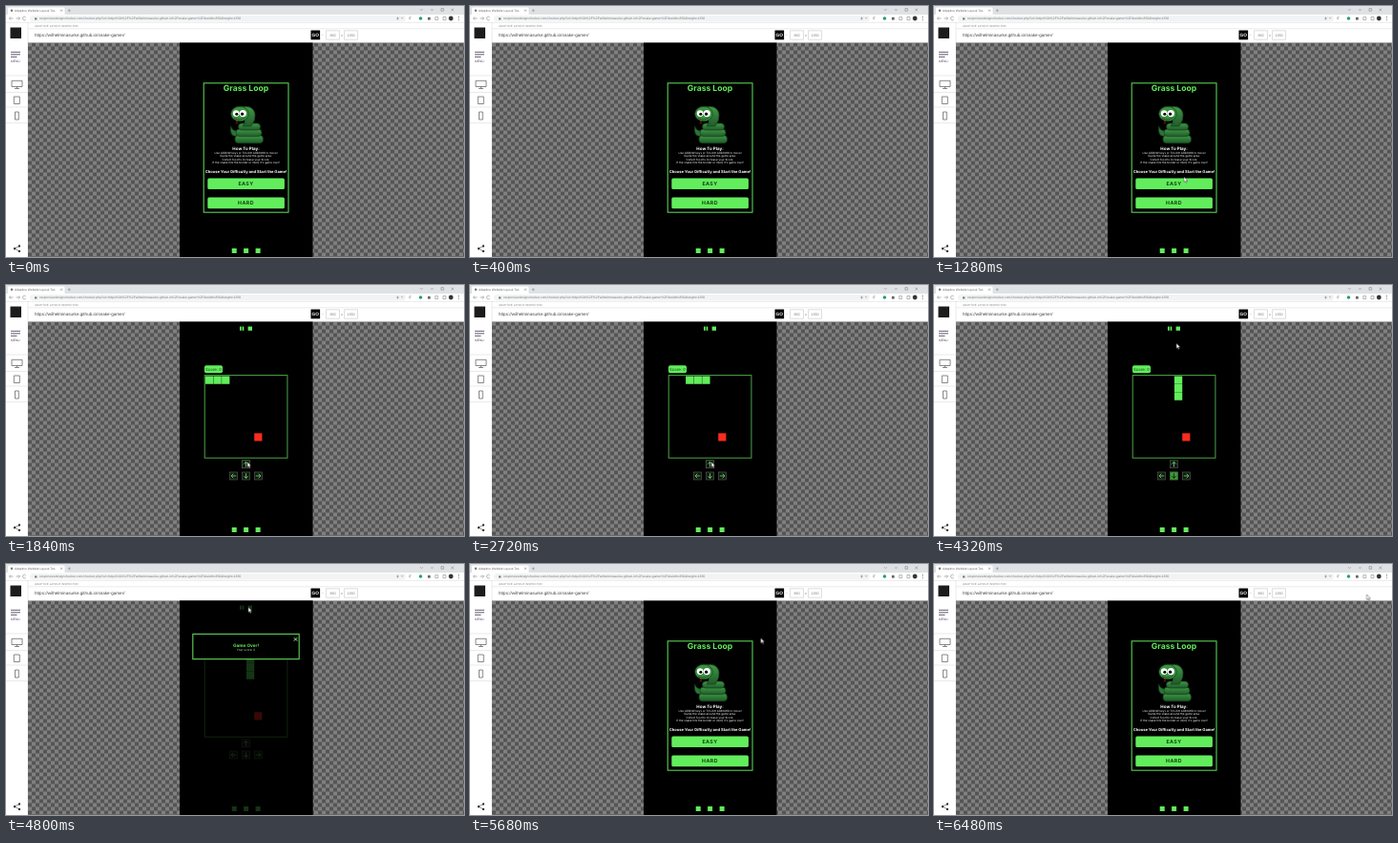
An HTML page that plays this animation: 480 px wide and 263 px high, repeating every 6.56 s.

```html
<!DOCTYPE html>
<html lang="en">
<head>
<meta charset="utf-8">
<title>Grass Loop demo</title>
<style>
  :root { --green: #62ee5c; --loop: 6560ms; }
  html, body { margin: 0; width: 100%; height: 100%; overflow: hidden; background: #fff; }
  svg { display: block; width: 100%; height: 100%; }
  text { font-family: "Liberation Sans", Arial, sans-serif; text-rendering: geometricPrecision; }
  .app text { font-family: Inter, Roboto, sans-serif; text-anchor: middle; }
  .app .bold { font-weight: 700; }
  .g { fill: var(--green); }
  .w { fill: #fff; }
  .frame { fill: none; stroke: #57d152; stroke-width: 1.1; }
  .board { fill: none; stroke: #4aa646; stroke-width: 1; }
  .icon { fill: none; stroke: #555; stroke-width: .7; }
  .thin { fill: none; stroke: #888; stroke-width: .6; }
  .rule { stroke: #dcdcdc; stroke-width: .6; }
  .key { fill: #141814; stroke: #5c625c; stroke-width: .6; }
  .arrow { fill: none; stroke: #5ad655; stroke-width: .9; }
  .lit .key { fill: #3f973c; stroke: #2f6a2d; }
  .lit .arrow { stroke: #0d260d; }

  .home, .game, .modal, .up, .down, .snake { animation: var(--loop) step-end infinite; }
  .home { animation-name: home; }
  .game { animation-name: game; }
  .modal { animation-name: modal; }
  .up { animation-name: up; }
  .down { animation-name: down; }
  .snake {
    fill: none; stroke: var(--green); stroke-width: 8.3;
    stroke-dasharray: 8.25 .35 8.25 .35 8.25 200;
    animation-name: crawl;
  }
  .cursor { animation: move var(--loop) linear infinite, show var(--loop) step-end infinite; }

  @keyframes home { 0%, 86.5% { visibility: visible } 25.5% { visibility: hidden } }
  @keyframes game { 0%, 86.5% { visibility: hidden } 25.5% { visibility: visible } }
  @keyframes modal { 0%, 86.5% { visibility: hidden } 69.5% { visibility: visible } }
  @keyframes up { 0%, 48.7% { opacity: 0 } 25.5% { opacity: 1 } }
  @keyframes down { 0%, 69.5% { opacity: 0 } 51.2% { opacity: 1 } }
  @keyframes crawl {
    0% { stroke-dashoffset: 0 }
    32.9% { stroke-dashoffset: -8.6 }
    41.4% { stroke-dashoffset: -17.2 }
    48.7% { stroke-dashoffset: -25.8 }
    56% { stroke-dashoffset: -34.4 }
    64.6% { stroke-dashoffset: -43 }
  }
  @keyframes show { 0% { opacity: 0 } 19.5% { opacity: 1 } }
  @keyframes move {
    0%, 19.5% { transform: translate(262px, 179px) }
    23.1%, 47.5% { transform: translate(253px, 185.5px) }
    50%, 53.5% { transform: translate(252px, 198px) }
    57.3% { transform: translate(255px, 181px) }
    67%, 75.6% { transform: translate(254px, 45.3px) }
    84.1%, 86.5% { transform: translate(303px, 78px) }
    96.3% { transform: translate(467px, 32px) }
    98.7%, 100% { transform: translate(453.5px, 32px) }
  }
</style>
</head>
<body>
<svg viewBox="0 0 480 263" preserveAspectRatio="none">
  <defs>
    <pattern id="check" x="23" y="38.5" width="8" height="8" patternUnits="userSpaceOnUse">
      <rect width="8" height="8" fill="#555"/>
      <path d="M0 0h4v4h-4zM4 4h4v4h-4z" fill="#808080"/>
    </pattern>
    <g id="key">
      <rect class="key" x="-4" y="-4" width="8" height="8"/>
      <path class="arrow" d="M0 2.7V-2.4M-2.3 -.2L0 -2.5L2.3 -.2"/>
    </g>
    <linearGradient id="skin" x2="0" y2="1">
      <stop offset="0" stop-color="#3f9a45"/>
      <stop offset="1" stop-color="#1f5a2a"/>
    </linearGradient>
  </defs>

  <!-- browser -->
  <rect width="480" height="263" fill="#fff"/>
  <rect width="480" height="9" fill="#dfe2e5"/>
  <path d="M2 9V3q0-1.5 1.5-1.5H60q1.5 0 1.5 1.5V9z" fill="#fff"/>
  <circle cx="6" cy="4.8" r="1.2" fill="#777"/>
  <text x="9" y="6" font-size="3.3" fill="#666">Adaptive Website Layout Tes</text>
  <path class="thin" d="M57 3.6l2.2 2.2m0-2.2l-2.2 2.2M64.8 4.8h3m-1.5-1.5v3M445 4h3M456 2.6h2.6v2.6h-2.6zM466.5 2.6l2.8 2.8m0-2.8l-2.8 2.8M434 3.2l1.4 1.4l1.4-1.4"/>
  <path class="thin" d="M7.5 13h-4m1.6-1.6L3.5 13l1.6 1.6M10.5 13h4m-1.6-1.6l1.6 1.6l-1.6 1.6M20.8 12a1.8 1.8 0 1 0 0 2"/>
  <rect x="25" y="10" width="394" height="6.2" rx="3.1" fill="#f1f3f4"/>
  <rect x="30" y="12.4" width="2.4" height="2" fill="#777"/>
  <text x="35" y="14.4" font-size="3.4" fill="#777">responsivedesignchecker.com/checker.php?url=https%3A%2F%2Fwilhelminasurke.github.io%2Fsnake-gamer%2F&amp;width=850&amp;height=1350</text>
  <path class="thin" d="M409 13h3m-1.5-1.5v3M414 12l1.2 1.2 1.2-1.2M424 13.8h-1.2v-2h2"/>
  <circle cx="434.5" cy="13" r="1.8" fill="#26a269"/>
  <path d="M442 11.8h2.8v2.8h-2.8z" fill="#666"/>
  <path class="thin" d="M449.8 11.6h3v3h-3zM458 11.5h3v3.2h-3z"/>
  <circle cx="466.3" cy="13" r="2.4" fill="#333"/>
  <path d="M474 11h.9v.9h-.9zm0 1.7h.9v.9h-.9zm0 1.7h.9v.9h-.9z" fill="#777"/>
  <path class="rule" d="M0 17.3H480M23 23.8H480M23 38.2H480M23 17V263"/>

  <!-- sidebar -->
  <rect x="4.5" y="22.5" width="11.5" height="11.5" fill="#1c1c1c"/>
  <path d="M5 48.3h10M5 50.8h10M5 53.3h6.5" stroke="#54465f" stroke-width=".9"/>
  <text x="9.8" y="58.6" font-size="3.3" fill="#54465f" text-anchor="middle">MENU</text>
  <path class="rule" d="M0 73H23M0 90.5H23M0 106H23M0 122.5H23"/>
  <path class="icon" d="M6 78.3h11v6.2H6zM11.5 84.5v2M9 86.5h5M8.3 95h6v7.5h-6zM9.5 111h3.8v8H9.5z"/>
  <path d="M14 251.5L9 254.2L14 257" class="icon"/>
  <path d="M13 250.6h2v2h-2zM8 253.2h2v2H8zM13 256h2v2h-2z" fill="#222"/>

  <!-- address row -->
  <text x="30" y="21.8" font-size="3" fill="#888">ADAPTIVE LAYOUT INSPECTOR</text>
  <text x="30" y="32.2" font-size="4.6" fill="#444">https://wilhelminasurke.github.io/snake-gamer/</text>
  <rect x="319.5" y="25.5" width="9.6" height="9.8" fill="#000"/>
  <text x="324.3" y="32.1" font-size="4.8" font-weight="700" fill="#fff" text-anchor="middle">GO</text>
  <g fill="none" stroke="#c8c8c8" stroke-width=".6">
    <path d="M335.5 25.8h14v9.4h-14zM354.5 25.8h14v9.4h-14zM331 30.4h1.6"/>
  </g>
  <g font-size="3.7" fill="#777" text-anchor="middle">
    <text x="342.5" y="31.8">850</text>
    <text x="352" y="31.8">x</text>
    <text x="361.5" y="31.8">1350</text>
  </g>

  <rect x="23" y="38.5" width="457" height="224.5" fill="url(#check)"/>
  <rect x="182" y="38.5" width="139.5" height="224.5" fill="#000"/>

  <g class="app">
    <path class="g" d="M236.7 254h5v5h-5zM249.1 254h5v5h-5zM261.6 254h5v5h-5z"/>

    <g class="home">
      <rect class="frame" x="207.2" y="80.8" width="88.8" height="135.4"/>
      <text class="g bold" x="251.5" y="88.8" font-size="8.6">Grass Loop</text>

      <g stroke="#163f1d" stroke-width=".7">
        <path d="M243 136Q234 138 235.5 126Q238 133 246 130z" fill="#2b7536"/>
        <rect x="240" y="135.5" width="29.5" height="8.3" rx="4.1" fill="url(#skin)"/>
        <rect x="241" y="129" width="27" height="7.6" rx="3.8" fill="url(#skin)"/>
        <rect x="243.5" y="123" width="23" height="7" rx="3.5" fill="url(#skin)"/>
        <path d="M246 106Q259 103 261 113Q262 119 257 126H248Q253 119 247 118z" fill="url(#skin)"/>
        <ellipse cx="245" cy="113" rx="9.3" ry="7.8" fill="#39913f"/>
        <path d="M239 117.5Q245 121 251 116.5" fill="none"/>
      </g>
      <circle class="w" cx="241.2" cy="112.6" r="3.4"/>
      <circle class="w" cx="248.3" cy="112.6" r="3.6"/>
      <circle cx="241.8" cy="113.2" r="1.5"/>
      <circle cx="247.6" cy="113.2" r="1.6"/>
      <path d="M242 119.5v3l-1 1m1-1l1 1" stroke="#d8322b" stroke-width=".6" fill="none"/>

      <g class="w">
        <text class="bold" x="251.5" y="151.2" font-size="4.5">How To Play:</text>
        <g font-size="2.95">
          <text x="251.5" y="154.8">Use ARROW keys or TOUCH ARROWS to move!</text>
          <text x="251.5" y="158.2">Guide the snake around the game area.</text>
          <text x="251.5" y="161.6">Collect food to increase your Score.</text>
          <text x="251.5" y="165">If the snake hits the border or itself, it's game over!</text>
        </g>
        <text class="bold" x="251.5" y="175" font-size="4.1">Choose Your Difficulty and Start the Game!</text>
      </g>
      <rect class="g" x="211.3" y="180.4" width="80.6" height="11.6" rx="1.5"/>
      <rect class="g" x="211.3" y="200.6" width="80.6" height="11.6" rx="1.5"/>
      <g font-size="5.3" letter-spacing=".4" fill="#123d12">
        <text class="bold" x="251.5" y="188.2">EASY</text>
        <text class="bold" x="251.5" y="208.4">HARD</text>
      </g>
    </g>

    <g class="game">
      <path class="g" d="M245 43.4h1.7v4.4H245zM247.6 43.4h1.7v4.4h-1.7zM253.6 43.4h4.4v4.4h-4.4z"/>
      <rect class="g" x="208" y="84.3" width="19" height="7.9" rx="1.8"/>
      <text x="217.5" y="89.9" font-size="4.3" fill="#123d12">Score: 0</text>
      <rect class="board" x="208.2" y="94.6" width="86.7" height="86.6"/>
      <path class="snake" d="M208.9 99.6H256.1V125"/>
      <rect x="260.2" y="155.3" width="8.2" height="8.2" fill="#fb2c1c"/>

      <use href="#key" transform="translate(251.5 187.8)"/>
      <use href="#key" transform="translate(238.5 200) rotate(-90)"/>
      <use href="#key" transform="translate(251.5 200) rotate(180)"/>
      <use href="#key" transform="translate(264.5 200) rotate(90)"/>
      <g class="up lit">
        <use href="#key" transform="translate(251.5 187.8)"/>
      </g>
      <g class="down lit">
        <rect class="key" x="247.5" y="196" width="8" height="8"/>
        <path class="arrow" d="M251.5 197.3V202.4M249.2 200.2L251.5 202.5L253.8 200.2"/>
      </g>
    </g>

    <g class="modal">
      <rect x="182" y="38.5" width="139.5" height="224.5" opacity=".78"/>
      <rect x="195.8" y="73.4" width="111.4" height="26.2" fill="#000" stroke="#57c452" stroke-width="1.2"/>
      <text class="g bold" x="251.5" y="86.6" font-size="4.7">Game Over!</text>
      <text x="251.5" y="91" font-size="3.1" fill="#b9e8b6">Your score: 0</text>
      <path d="M301.8 77.2l3.4 3.4m0-3.4l-3.4 3.4" stroke="#a6f5a2" stroke-width="1"/>
    </g>
  </g>

  <path class="cursor" d="M0 0V5.4L1.3 4.3L2.2 6.3L3.1 5.9L2.2 4H3.9z" fill="#fff" stroke="#222" stroke-width=".4"/>
</svg>
</body>
</html>
```
